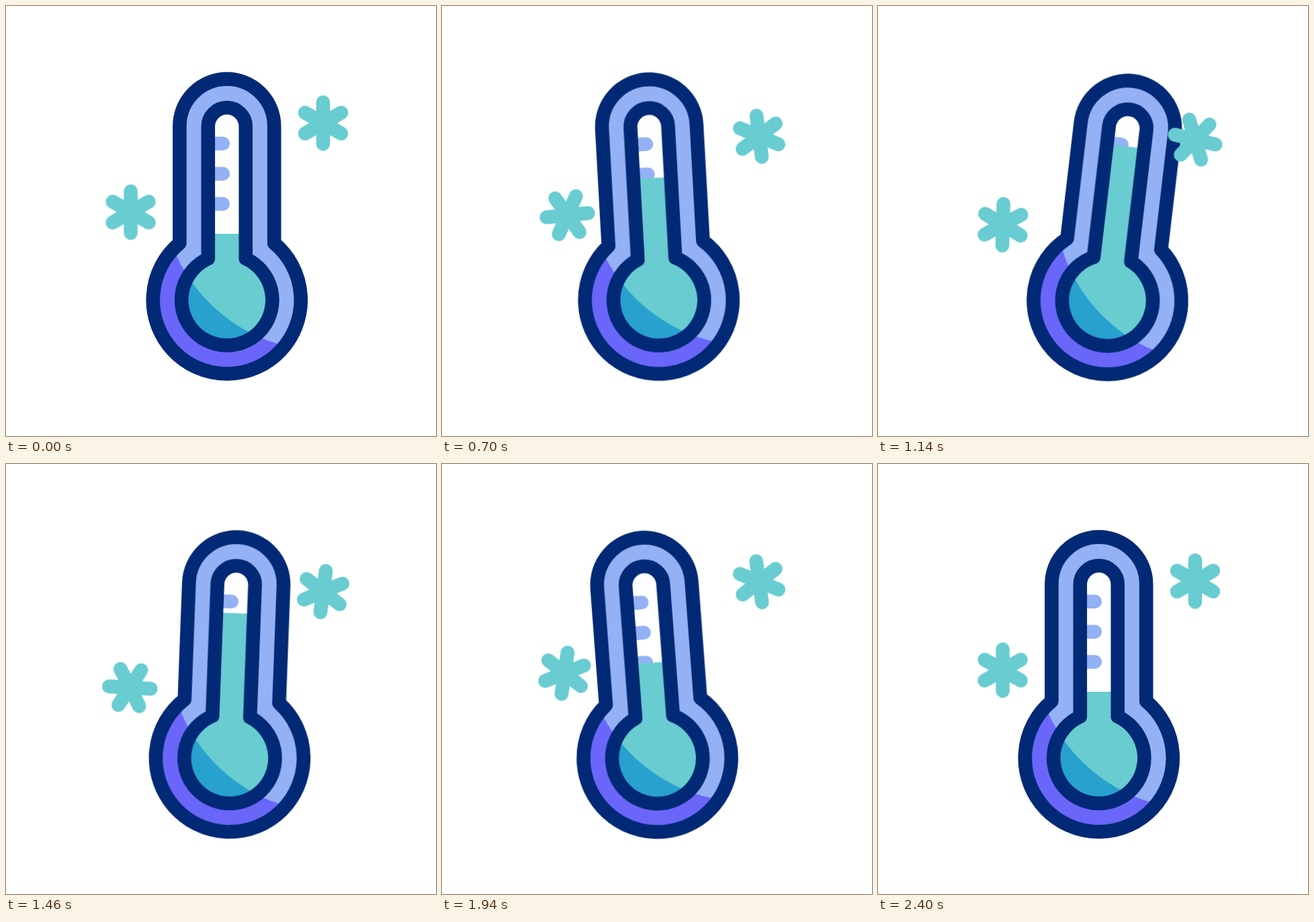
An HTML page without scripts that plays this animation: 640 px wide and 640 px high, repeating every 2420 ms.

```html
<!DOCTYPE html>
<html lang="en">
<head>
<meta charset="utf-8">
<title>Cold thermometer</title>
<style>
  html, body { margin: 0; width: 100%; height: 100%; overflow: hidden; background: #fff; }
  svg { display: block; width: 100%; height: 100%; }

  .outline { fill: none; stroke: #022975; stroke-width: 20.6; stroke-linejoin: round; }
  .ticks { stroke: #93b1f4; stroke-width: 20.6; stroke-linecap: round; }
  .flake { stroke: #68ccd1; stroke-width: 20.6; stroke-linecap: round; }

  .swing, .liquid, .drop, .drift, .spin {
    animation: 2420ms cubic-bezier(.333, 0, .667, 1) infinite;
  }
  .swing { transform-origin: 328.8px 546.7px; animation-name: swing; }
  .liquid { animation-name: rise; }
  .right .drop { animation-name: drop-right; }
  .right .spin { animation-name: spin-right; }
  .left .drop { animation-name: drop-left; }
  .left .drift { animation-name: drift-left; }
  .left .spin { animation-name: spin-left; }

  @keyframes swing {
    0%, 99.174%, 100% { transform: rotate(0deg); }
    24.793% { transform: rotate(-4deg); }
    49.587% { transform: rotate(7deg); }
    74.38% { transform: rotate(-5deg); }
  }
  @keyframes rise {
    0%, 99.174%, 100% { transform: translateY(0); }
    49.587% { transform: translateY(-133.4px); }
  }
  @keyframes drop-right {
    0%, 85.124%, 100% { transform: translateY(0); }
    42.149% { transform: translateY(25.5px); }
  }
  @keyframes spin-right {
    0%, 85.124%, 100% { transform: rotate(0deg); }
    20.661% { transform: rotate(-41deg); }
    42.149% { transform: rotate(60deg); }
    63.636% { transform: rotate(-60deg); }
  }
  @keyframes drop-left {
    0%, 16.116%, 85.95%, 100% { transform: translateY(0); }
    64.463% { transform: translateY(26.6px); }
  }
  @keyframes drift-left {
    0%, 16.116%, 89.256%, 100% { transform: translateX(0); }
    28.926% { transform: translateX(1px); }
    47.107% { transform: translateX(.3px); }
    60.33% { transform: translateX(-1.3px); }
    67.769% { transform: translateX(-8.8px); animation-timing-function: cubic-bezier(.4, 0, .7, .7); }
    80.165% { transform: translateX(-3.2px); animation-timing-function: cubic-bezier(.3, .5, .6, 1); }
  }
  @keyframes spin-left {
    0%, 14.05%, 99.174%, 100% { transform: rotate(0deg); }
    35.124% { transform: rotate(-45deg); }
    57.438% { transform: rotate(38.5deg); }
    77.686% { transform: rotate(-53.7deg); }
  }
</style>
</head>
<body>
<svg viewBox="0 0 640 640">
  <defs>
    <path id="shell" d="M258.4 353V179a70.4 70.4 0 0 1 140.8 0V353A110 110 0 1 1 258.4 353Z"/>
    <path id="tube" d="M300.8 376V179.3a28 28 0 0 1 56 0V376A67.6 67.6 0 1 1 300.8 376Z"/>
    <path id="shade" d="M246 356L253 370A243 243 0 0 0 405 503L420 509V560H200V356Z"/>
    <path id="star" d="M0-31V31M-26.9-15.5L26.9 15.5M-26.9 15.5L26.9-15.5"/>
    <clipPath id="in-shell"><use href="#shell"/></clipPath>
    <clipPath id="in-tube"><use href="#tube"/></clipPath>
  </defs>

  <g class="swing">
    <g clip-path="url(#in-shell)">
      <use href="#shell" fill="#93b1f4"/>
      <use href="#shade" fill="#6a66f9"/>
    </g>
    <g clip-path="url(#in-tube)">
      <use href="#tube" fill="#fff"/>
      <path class="ticks" d="M305 204.8h17.8M305 249.7h17.8M305 294.5h17.8"/>
      <rect class="liquid" x="250" y="339" width="160" height="320" fill="#68ccd1"/>
      <use href="#shade" fill="#28a1ce"/>
    </g>
    <use href="#shell" class="outline"/>
    <use href="#tube" class="outline"/>
  </g>

  <g class="flake right" transform="translate(472 174.3)">
    <g class="drop"><g class="spin"><use href="#star"/></g></g>
  </g>
  <g class="flake left" transform="translate(185.6 306.7)">
    <g class="drop"><g class="drift"><g class="spin"><use href="#star"/></g></g></g>
  </g>
</svg>
</body>
</html>
```
